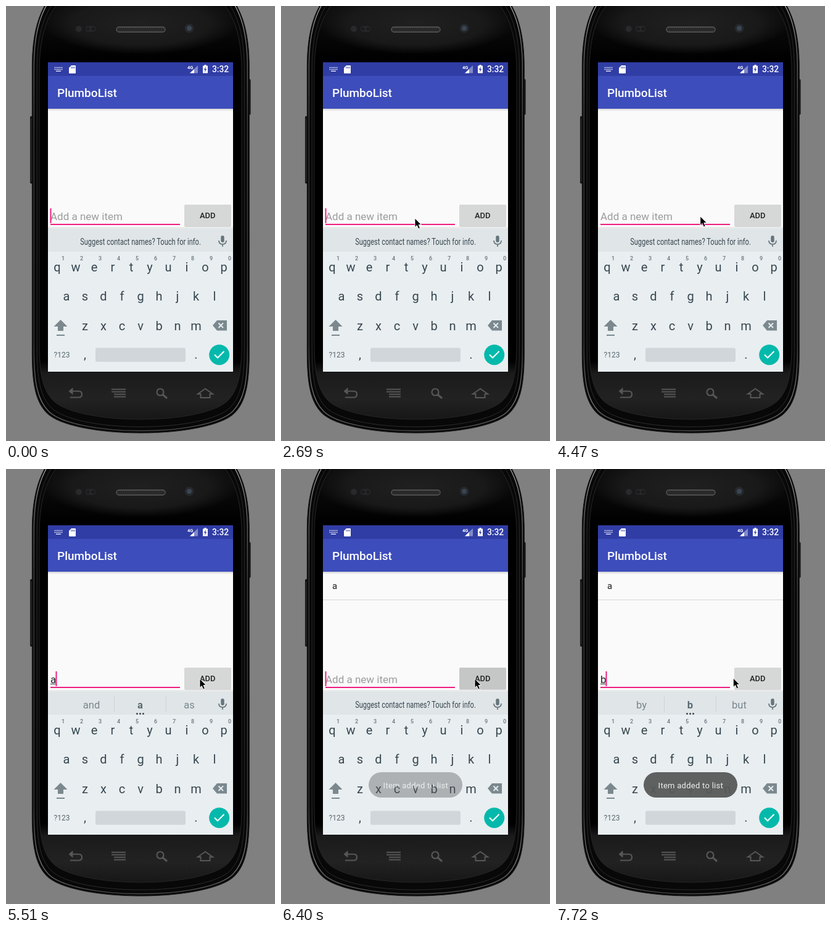
An HTML page that plays this animation: 436 px wide and 703 px high, repeating every 8 s.

```html
<!DOCTYPE html>
<html lang="en">
<head>
<meta charset="utf-8">
<title>Todo app demo</title>
<style>
  html, body { margin: 0; width: 100%; height: 100%; overflow: hidden; background: #808080; }
  svg { display: block; width: 436px; height: 703px; }
  text { font-family: Roboto, sans-serif; white-space: pre; }
  .mid { text-anchor: middle; }
  .key { font-size: 20px; fill: #37474f; }
  .num { font-size: 9px; fill: #66767e; font-weight: 500; }
  .word { font-size: 16.5px; fill: #78868c; }
</style>
</head>
<body>
<svg viewBox="0 0 436 703">
  <defs>
    <path id="body" vector-effect="non-scaling-stroke" d="M-142 -20C-166 8 -176 45 -176 100V560C-176 612 -170 640 -152 658C-132 678 -68 690 0 690C68 690 132 678 152 658C170 640 176 612 176 560V100C176 45 166 8 142 -20Z"/>
    <linearGradient id="face" x2="0" y2="1">
      <stop offset="0" stop-color="#101010"/><stop offset=".14" stop-color="#000"/>
      <stop offset=".86" stop-color="#000"/><stop offset=".89" stop-color="#1b1b1b"/>
      <stop offset=".95" stop-color="#222"/><stop offset="1" stop-color="#171717"/>
    </linearGradient>
    <radialGradient id="glow">
      <stop offset="0" stop-color="#202020"/><stop offset=".7" stop-color="#191919"/>
      <stop offset="1" stop-color="#191919" stop-opacity="0"/>
    </radialGradient>
    <linearGradient id="rim" x2="0" y2="1">
      <stop offset="0" stop-color="#aaa"/><stop offset=".12" stop-color="#666"/>
      <stop offset=".3" stop-color="#3c3c3c"/><stop offset=".8" stop-color="#383838"/>
      <stop offset=".93" stop-color="#777"/><stop offset="1" stop-color="#484848"/>
    </linearGradient>
    <linearGradient id="shade" x2="0" y2="1">
      <stop offset="0" stop-opacity=".16"/><stop offset="1" stop-opacity="0"/>
    </linearGradient>
    <pattern id="mesh" width="3" height="3" patternUnits="userSpaceOnUse">
      <rect width="3" height="3" fill="#151515"/><path d="M0 0L3 3M3 0L0 3" stroke="#484848" stroke-width=".7"/>
    </pattern>
  </defs>

  <!-- phone body -->
  <rect x="39" y="178" width="6" height="109" rx="2" fill="#111"/>
  <path d="M40.5 182V284" stroke="#333"/>
  <rect x="391" y="118" width="5.500" height="58" rx="2" fill="#111"/>
  <use href="#body" transform="translate(218.300 0)" fill="#080808" stroke="#1b1b1b"/>
  <use href="#body" transform="translate(218.300 0) scale(.983 .995)" fill="none" stroke="url(#rim)" stroke-width="1.400"/>
  <use href="#body" transform="translate(218.300 6) scale(.955 .977)" fill="none" stroke="#2c2c2c"/>
  <use href="#body" transform="translate(218 12.500) scale(.932 .95)" fill="url(#face)" stroke="#262626"/>
  <ellipse cx="218" cy="28" rx="158" ry="50" fill="url(#glow)"/>

  <!-- sensors and earpiece -->
  <circle cx="118" cy="37" r="5" fill="#29292c"/>
  <rect x="129" y="32.500" width="16" height="9" rx="4" fill="#29292b"/>
  <circle cx="133" cy="37" r="3" fill="#1b1b1e"/><circle cx="141" cy="37" r="3" fill="#1b1b1e"/>
  <rect x="179" y="34" width="79" height="8" rx="4" fill="url(#mesh)" stroke="#5c5c5c" stroke-width="1.300"/>
  <circle cx="297" cy="36" r="7.500" fill="#25292d"/><circle cx="297" cy="36" r="4" fill="#3a4550"/>

  <!-- hardware keys -->
  <g fill="none" stroke="#575757" stroke-width="2.200">
    <path d="M107 622.500H118Q123 622.500 123 627.500T118 632.500H104"/>
    <path d="M108 617.500L102 622.500L108 627.500Z" fill="#575757" stroke-width="1"/>
    <path d="M171 619.500H194M171 623.500H194M175 627.500H194M175 631.500H194" stroke-width="1.800"/>
    <circle cx="250" cy="624" r="5.500"/><path d="M254 628L261 634" stroke-width="3"/>
    <path d="M323 618.500L311 627H315.500V633H330.500V627H335Z" stroke-width="2"/>
  </g>

  <!-- app -->
  <rect x="68" y="91" width="300" height="500" fill="#fafafa"/>
  <rect x="68" y="166" width="300" height="4" fill="url(#shade)"/>
  <rect x="68" y="113" width="300" height="53" fill="#3d4dbb"/>
  <rect x="68" y="91" width="300" height="22" fill="#303da5"/>
  <g fill="none" stroke="#dfe2f4">
    <path d="M78.500 99.500H91.500M78.500 102.500H91.500" stroke-width="1.600" stroke-dasharray="1.500 .8"/>
    <path d="M81 105.300H89" stroke-width="1.400"/>
  </g>
  <path d="M106 96H112Q113 96 113 97V108Q113 109 112 109H103Q102 109 102 108V100Z" fill="#fff"/>
  <path d="M106 98V101M108.500 98V101M111 98V101" stroke="#303da5"/>
  <text x="294" y="101.500" font-size="7.500" font-weight="700" fill="#fff">4G</text>
  <path d="M311 96V108.500H298Z" fill="#8189c9"/><path d="M305 102V108.500H298Z" fill="#fff"/>
  <path d="M321.500 95H324.500V96.500H327V108.500H319V96.500H321.500Z" fill="#fff"/>
  <path d="M324 98L320.800 103H322.700L322 107L325.200 102H323.300Z" fill="#303da5"/>
  <text x="334" y="107.300" font-size="13.800" font-weight="500" fill="#fff">3:32</text>
  <text x="83" y="147" font-size="19" font-weight="500" fill="#fff">PlumboList</text>

  <g id="item">
    <text x="83" y="194" font-size="15" fill="#222">a</text>
    <path d="M68 211.500H368" stroke="#d4d4d4"/>
  </g>
  <path d="M72 353H282" stroke="#ee1f80" stroke-width="2"/>
  <text id="hint" x="72" y="345.500" font-size="17" fill="#9c9c9c">Add a new item</text>
  <text id="typed" x="72" y="345.500" font-size="17" fill="#222"></text>
  <path id="under" d="M72 347.500H80.500" stroke="#333"/>
  <rect id="caret" y="327" width="2" height="24" fill="#ee1f80"/>
  <rect x="289" y="322" width="76" height="35" rx="2" fill="#bdbdbd" opacity=".6"/>
  <rect id="button" x="289" y="321" width="76" height="35" rx="2"/>
  <text class="mid" x="326.700" y="343" font-size="13" font-weight="500" fill="#222">ADD</text>

  <!-- keyboard -->
  <rect x="68" y="357" width="300" height="4" fill="#000" opacity=".06"/>
  <rect x="68" y="359.500" width="300" height="38" fill="#e0e5e8"/>
  <rect x="68" y="397.500" width="300" height="193.500" fill="#e9eef1"/>
  <text id="ask" class="mid" transform="translate(218 386) scale(.79 1)" font-size="14" fill="#37474f">Suggest contact names? Touch for info.</text>
  <g id="words">
    <path d="M175.500 368V392M259.500 368V392" stroke="#cbd2d5"/>
    <text class="mid word" x="138.500" y="387"></text>
    <text class="mid word" x="217.500" y="387" style="font-weight:700;fill:#5b6a71"></text>
    <text class="mid word" x="297" y="387"></text>
    <path d="M212.500 395.500H223" stroke="#37474f" stroke-width="3" stroke-linecap="round" stroke-dasharray="0 5"/>
  </g>
  <rect x="348.300" y="371" width="5.400" height="11" rx="2.700" fill="#66757c"/>
  <path d="M345 379Q345 385 351 385T357 379M351 385V389" fill="none" stroke="#66757c" stroke-width="1.700"/>
  <g id="keys"></g>
  <path d="M88.500 507L99.500 518H93V525H84V518H77.500Z" fill="#7b898f"/>
  <path d="M82 532H95" stroke="#7b898f" stroke-width="2"/>
  <path d="M342 508H358V524.500H342L335 516.200Z" fill="#7b898f"/>
  <path d="M344.500 512.500L352 520M352 512.500L344.500 520" stroke="#e9eef1" stroke-width="1.800"/>
  <text class="mid" x="90.500" y="568" font-size="12" fill="#55656c">?123</text>
  <rect x="145" y="552.500" width="146" height="22.500" rx="3" fill="#d0d6d9"/>
  <circle cx="345.700" cy="563.700" r="16.500" fill="#04b9ab"/>
  <path d="M338 563.500L343 568.500L353.500 558" fill="none" stroke="#fff" stroke-width="2"/>

  <g id="toast">
    <rect x="142" y="490" width="152" height="41" rx="20.500" fill="#575959" opacity=".94"/>
    <text class="mid" x="218.300" y="516" font-size="13" letter-spacing=".27" fill="#eee">Item added to list</text>
  </g>
  <path id="mouse" d="M0 0V14.500L3.300 11.500L5.700 17L8.300 15.900L6 10.500H10.500Z" fill="#000" stroke="#fff" stroke-width=".9"/>
</svg>
<script>
const LOOP = 8000;
const FRAME = LOOP / 54;
const BLINK = 480;
const ADDED = 6200;
const $ = id => document.getElementById(id);

// Each edit sets the field and restarts the caret blink.
const edits = [
  { time: -230, text: '' },
  { time: 4480, text: 'a', words: ['and', 'a', 'as'] },
  { time: ADDED, text: '' },
  { time: 7700, text: 'b', words: ['by', 'b', 'but'] }
];

// The pointer enters from the keyboard and glides between a few stops.
const entry = { time: 1180, x: 278, y: 611 };
const glides = [
  { time: 1180, span: 300, x: 213.5, y: 403.5 },
  { time: 1480, span: 600, x: 217, y: 343 },
  { time: 3200, span: 500, x: 184.5, y: 340.5 },
  { time: 4000, span: 1050, x: 314, y: 339 },
  { time: 6450, span: 220, x: 287.3, y: 338 }
];

const clamp = v => Math.min(1, Math.max(0, v));
const progress = (t, start, span) => clamp((t - start) / span);
const ease = p => (1 - Math.cos(Math.PI * p)) / 2;
const show = (id, on) => $(id).style.display = on ? '' : 'none';

function pointer(t) {
  let { x, y } = entry;
  for (const g of glides) {
    const p = ease(progress(t, g.time, g.span));
    x += (g.x - x) * p;
    y += (g.y - y) * p;
  }
  return `translate(${x} ${y})`;
}

function addKey(label, x, y, cls = 'key') {
  const el = document.createElementNS('http://www.w3.org/2000/svg', 'text');
  el.setAttribute('class', 'mid ' + cls);
  el.setAttribute('x', x);
  el.setAttribute('y', y);
  el.textContent = label;
  $('keys').append(el);
}
const addRow = (keys, x, y, cls) => [...keys].forEach((k, i) => addKey(k, x + i * 30, y, cls));
addRow('qwertyuiop', 83, 428.5);
addRow('1234567890', 92.5, 411, 'num');
addRow('asdfghjkl', 98, 476);
addRow('zxcvbnm', 128, 523.5);
addKey(',', 128, 570);
addKey('.', 308, 570);

const wordEls = $('words').querySelectorAll('text');

function draw(t) {
  const { time, text, words } = edits.findLast(e => e.time <= t);
  $('typed').textContent = text;
  show('hint', !text);
  show('under', text);
  show('ask', !text);
  show('words', text);
  wordEls.forEach((el, i) => el.textContent = words ? words[i] : '');

  show('caret', Math.floor((t - time) / BLINK) % 2 === 0);
  $('caret').setAttribute('x', text ? 80.5 : 71.5);

  show('item', t >= ADDED);
  $('toast').setAttribute('opacity', progress(t, ADDED, 400));
  const press = Math.sin(Math.PI * progress(t, 5800, 1050));
  const gray = Math.round(215 - 17 * press);
  $('button').setAttribute('fill', `rgb(${gray - 1},${gray},${gray})`);

  show('mouse', t >= entry.time);
  $('mouse').setAttribute('transform', pointer(t));
}

const start = performance.now();
function tick() {
  const t = (performance.now() - start) % LOOP;
  draw(Math.floor(t / FRAME) * FRAME);
  requestAnimationFrame(tick);
}
tick();
</script>
</body>
</html>
```
